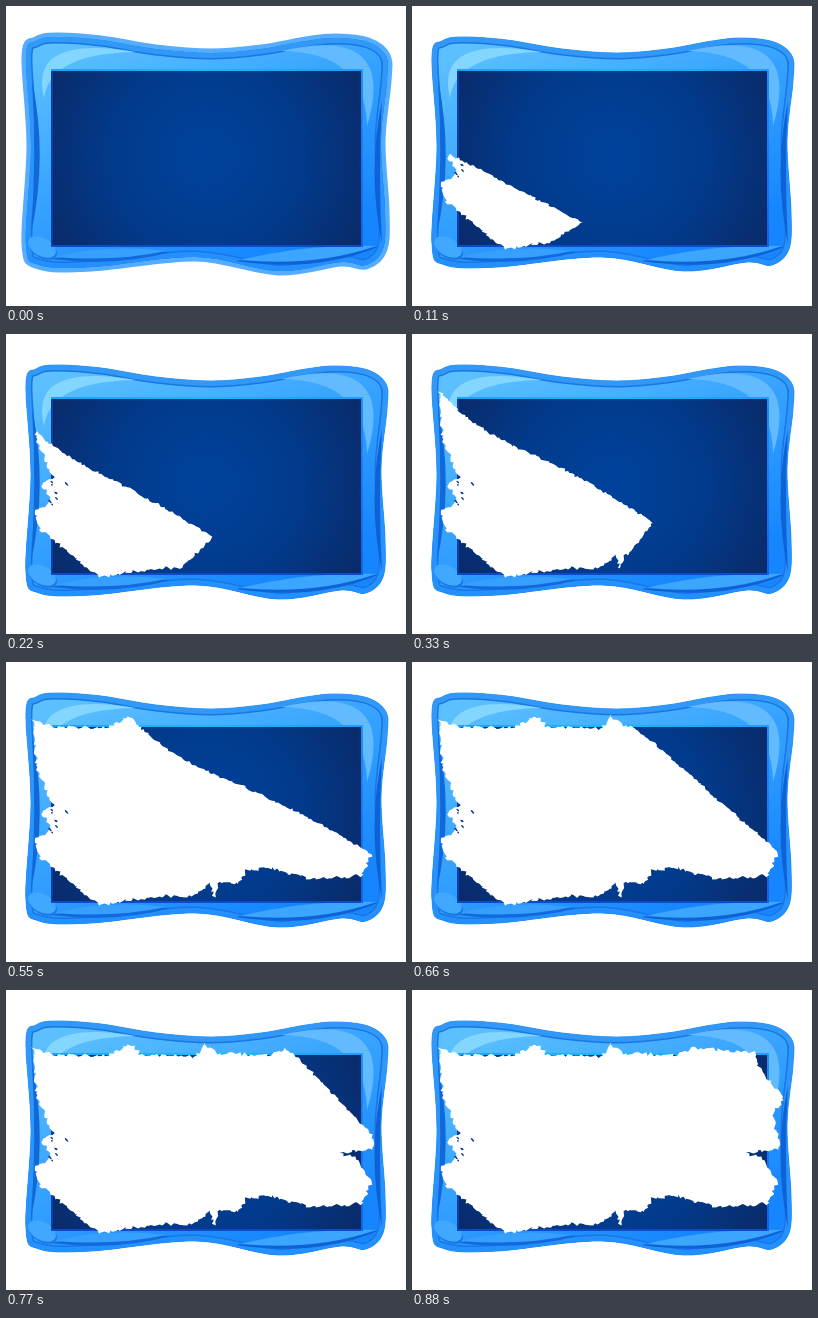
Recreate the animation shown at these times as an HTML page with a canvas. Size 400x300 px, loop 990 ms.

```html
<!DOCTYPE html>
<html lang="en">
<head>
<meta charset="utf-8">
<title>Blue frame wipe</title>
<style>
html, body { margin: 0; width: 100%; height: 100%; overflow: hidden; background: #fff; }
canvas { display: block; width: 400px; height: 300px; }
</style>
</head>
<body>
<canvas id="stage" width="400" height="300"></canvas>
<script>
const ctx = document.getElementById('stage').getContext('2d');
const STEP = 110, STEPS = 9;

function seeded(seed) {
  return () => {
    seed = (seed * 16807) % 2147483647;
    return seed / 2147483647;
  };
}

// Closed smooth curve through all points.
function smooth(points) {
  const path = new Path2D(), n = points.length;
  path.moveTo(...points[0]);
  for (let i = 0; i < n; i++) {
    const [a, b, c, d] = [n - 1, 0, 1, 2].map(k => points[(i + k) % n]);
    path.bezierCurveTo(
      b[0] + (c[0] - a[0]) / 6, b[1] + (c[1] - a[1]) / 6,
      c[0] - (d[0] - b[0]) / 6, c[1] - (d[1] - b[1]) / 6, c[0], c[1]);
  }
  path.closePath();
  return path;
}

// Closed polygon with torn edges.
function torn(points, amount, seed) {
  const path = new Path2D(), rnd = seeded(seed);
  points.forEach(([x, y], i) => {
    const [nx, ny] = points[(i + 1) % points.length];
    const count = Math.ceil(Math.hypot(nx - x, ny - y) / 2.5);
    for (let k = 0; k < count; k++) {
      const u = k / count;
      path.lineTo(x + (nx - x) * u + (rnd() - 0.5) * amount,
                  y + (ny - y) * u + (rnd() - 0.5) * amount);
    }
  });
  path.closePath();
  return path;
}

// Leaf between two tips; each side bends towards its own control point.
function leaf(from, bend, to, bendBack) {
  const path = new Path2D();
  path.moveTo(...from);
  path.quadraticCurveTo(...bend, ...to);
  path.quadraticCurveTo(...bendBack, ...from);
  return path;
}

function oval(x, y, rx, ry, angle) {
  const path = new Path2D();
  path.ellipse(x, y, rx, ry, angle, 0, Math.PI * 2);
  return path;
}

function gradient(x0, y0, x1, y1, ...colors) {
  const g = ctx.createLinearGradient(x0, y0, x1, y1);
  colors.forEach((c, i) => g.addColorStop(i / (colors.length - 1), c));
  return g;
}

function fill(shape, color) {
  ctx.fillStyle = color;
  ctx.fill(shape);
}

function line(shape, color, width) {
  ctx.strokeStyle = color;
  ctx.lineWidth = width;
  ctx.stroke(shape);
}

function box(x, y, w, h, color) {
  ctx.fillStyle = color;
  ctx.fillRect(x, y, w, h);
}

const outline = smooth([
  [20, 50], [30, 35], [50, 31], [95, 34], [150, 43], [205, 47], [255, 43],
  [300, 35], [330, 32], [362, 36], [380, 50], [381, 75], [375, 135],
  [379, 205], [377, 243], [360, 259], [335, 256], [272, 265], [190, 251],
  [85, 261], [33, 259], [20, 238], [25, 140]
]);

function drawFrame(halo) {
  line(outline, '#55adff', halo ? 9 : 1);
  fill(outline, gradient(110, 20, 220, 270, '#5cc0ff', '#36a2ff', '#1686ff'));

  ctx.save();
  ctx.clip(outline);
  line(outline, '#1976e2', 13);
  line(outline, gradient(0, 30, 0, 260, '#3299f8', '#2390ff'), 10);

  fill(leaf([26, 75], [42, 150], [25, 228], [31, 150]), '#1168d8');
  fill(leaf([376, 95], [361, 165], [376, 238], [372, 165]), '#0f62d6');
  fill(leaf([38, 92], [22, 28], [130, 46], [44, 47]), '#83d6ff');
  fill(leaf([361, 120], [392, 18], [275, 45], [360, 46]), '#62bbff');

  fill(leaf([45, 253], [100, 239], [165, 246], [110, 261]), '#1269dc');
  fill(leaf([48, 251], [100, 238], [160, 245], [110, 256]), '#37a0ff');
  fill(leaf([230, 255], [300, 238], [372, 241], [310, 267]), '#0f62d6');
  fill(leaf([234, 254], [300, 238], [370, 240], [310, 261]), '#3ca6ff');
  fill(oval(37, 243, 15, 9, 0.5), '#1976e2');
  fill(oval(36, 241, 15, 9, 0.5), '#40a8ff');
  ctx.restore();
}

// Bevelled panel with a soft glow in the middle.
function drawPanel() {
  box(45, 63, 312, 178, '#0c3fae');
  box(45, 239, 312, 2, '#1048c6');
  box(355, 63, 2, 178, gradient(0, 63, 0, 241, '#1e90ff', '#1261ea'));
  box(45, 63, 312, 2, gradient(45, 0, 357, 0, '#18a4ff', '#12bcff', '#1e9cff'));

  const glow = ctx.createRadialGradient(200, 150, 10, 200, 150, 180);
  glow.addColorStop(0, '#00429b');
  glow.addColorStop(0.5, '#023a8b');
  glow.addColorStop(1, '#0a2a68');
  box(47, 65, 308, 174, glow);
}

// The finished white area, clockwise from the upper left.
const paint = torn([
  [27, 58], [50, 65], [105, 65], [122, 53], [135, 65], [190, 67], [197, 54],
  [212, 63], [262, 65], [283, 58], [343, 63], [345, 75], [372, 108],
  [361, 124], [368, 160], [334, 163], [352, 170], [365, 193], [356, 214],
  [303, 217], [264, 206], [240, 208], [232, 222], [214, 221], [208, 234],
  [203, 222], [188, 235], [150, 234], [92, 243], [62, 218], [33, 194],
  [30, 178], [46, 167], [36, 151], [47, 142], [31, 106]
], 4, 71);

// Wipe edge from upper left to lower right, sagging near its start.
function front([x0, y0, x1, y1, sag], i) {
  const points = [[0, y0 - 10]], n = 12;
  for (let k = 0; k <= n; k++) {
    const u = k / n;
    const dip = sag * Math.sin(Math.PI * u) * (1 - u) ** 3;
    points.push([x0 + (x1 - x0) * u, y0 + (y1 - y0) * u + dip]);
  }
  points.push([x1 - 40, 242], [x1 - 60, 290], [0, 290]);
  return torn(points, 2.5, 300 + i * 17);
}

const fronts = [
  [33, 146, 170, 216, 0],
  [27, 95, 207, 203, 20],
  [27, 56, 241, 188, 40],
  [75, 50, 303, 190, 45],
  [118, 48, 376, 198, 48],
  [200, 51, 376, 197, -15],
  [268, 50, 388, 165, -15]
].map(front);

// Blue specks left in the white near the left edge.
const rnd = seeded(29);
const specks = Array.from({ length: 8 }, () =>
  oval(44 + rnd() * 18, 148 + rnd() * 24, 0.8 + rnd() * 1.6, 0.8, 0.8));

function drawPaint(step) {
  if (!step) return;
  ctx.save();
  if (step <= fronts.length) ctx.clip(fronts[step - 1]);
  fill(paint, '#fff');
  specks.forEach(speck => fill(speck, '#0b3a8e'));
  ctx.restore();
}

function render(now) {
  const step = Math.floor(now / STEP) % STEPS;
  box(0, 0, 400, 300, '#fff');
  drawFrame(step === 0);
  drawPanel();
  drawPaint(step);
}

let start;
function tick() {
  const now = performance.now();
  start ??= now;
  render(now - start);
  requestAnimationFrame(tick);
}
tick();
</script>
</body>
</html>
```
